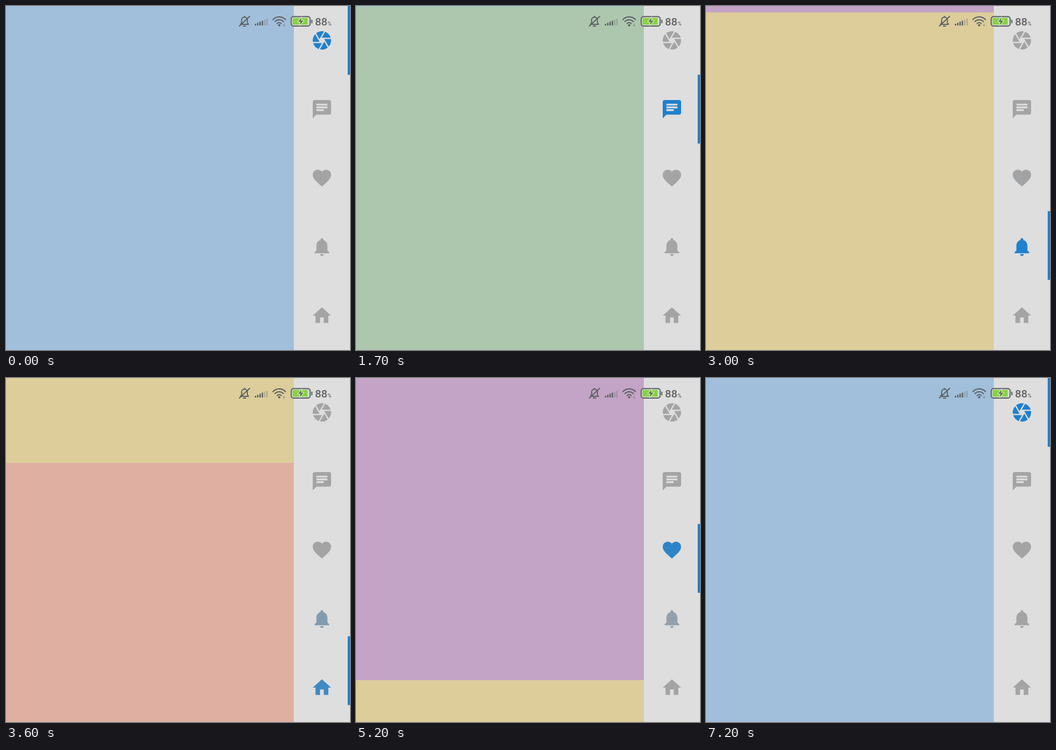
Recreate the animation shown at these times as an HTML page with a canvas. Size 600 px wide and 600 px high, loop 7300 ms.

```html
<!DOCTYPE html>
<html lang="en">
<head>
<meta charset="utf-8">
<title>Vertical tabs</title>
<style>
  html, body { margin: 0; width: 100%; height: 100%; overflow: hidden; background: #dedede; }
  canvas { display: block; width: 600px; height: 600px; }
</style>
</head>
<body>
<canvas id="stage" width="600" height="600"></canvas>
<script>
const ctx = document.getElementById('stage').getContext('2d');
const LOOP = 7300, STEP = 100, SIZE = 600, TAB = 120, PAGE_W = 502;
const PAGES = ['#a1bfda', '#acc7ae', '#c3a3c6', '#dccd9b', '#dfb0a2'];
const GREY = [164, 164, 164], BLUE = [31, 128, 205];
const INK = '#5d6163';

// Each swipe: start, duration, direction
const SWIPES = [
  [800, 1000, 1], [1800, 630, 1], [2450, 700, 1], [3250, 700, 1],
  [4020, 700, -1], [4774, 700, -1], [5686, 700, -1], [6430, 700, -1]
];

// Short drag, then a long settle
const swipe = u => 1 - Math.pow(1 - Math.pow(u, 1.6), 3.5);
const clamp = u => Math.min(1, Math.max(0, u));

const scrollAt = t => SWIPES.reduce(
  (sum, [start, length, dir]) => sum + dir * swipe(clamp((t - start) / length)), 0);

const shutter = new Path2D();
const blade = new Path2D('M21.54 9c-.92-2.92-3.15-5.26-6-6.34L11.88 9h9.66z');
for (let i = 0; i < 6; i++) {
  const turn = new DOMMatrix().translate(12, 12).rotate(i * 60).translate(-12, -12);
  shutter.addPath(blade, turn);
}

const ICONS = [
  shutter,
  new Path2D('M20 2H4c-1.1 0-2 .9-2 2v18l4-4h14c1.1 0 2-.9 2-2V4c0-1.1-.9-2-2-2z' +
    'M6 9h12v2H6zM6 12h8v2H6zM6 6h12v2H6z'),
  new Path2D('M12 21.35l-1.45-1.32C5.4 15.36 2 12.28 2 8.5 2 5.42 4.42 3 7.5 3' +
    'c1.74 0 3.41.81 4.5 2.09C13.09 3.81 14.76 3 16.5 3 19.58 3 22 5.42 22 8.5' +
    'c0 3.78-3.4 6.86-8.55 11.54z'),
  new Path2D('M12 22c1.1 0 2-.9 2-2h-4c0 1.1.9 2 2 2zM18 16v-5c0-3.07-1.64-5.64-4.5-6.32V4' +
    'c0-.83-.67-1.5-1.5-1.5s-1.5.67-1.5 1.5v.68C7.63 5.36 6 7.92 6 11v5l-2 2v1h16v-1z'),
  new Path2D('M10 20v-6h4v6h5v-8h3L12 3 2 12h3v8z')
];

function rect(x, y, w, h, color) {
  ctx.fillStyle = color;
  ctx.fillRect(x, y, w, h);
}

function line(path, width, color) {
  ctx.lineWidth = width;
  ctx.strokeStyle = color;
  ctx.stroke(new Path2D(path));
}

function drawPages(pos) {
  PAGES.forEach((color, i) => {
    const y = Math.round((i - pos) * SIZE);
    if (Math.abs(y) < SIZE) rect(0, y, PAGE_W, SIZE, color);
  });
}

function drawTabs(pos) {
  rect(PAGE_W, 0, SIZE - PAGE_W, SIZE, '#dedede');
  ICONS.forEach((icon, i) => {
    const mix = clamp(1 - Math.abs(i - pos));
    const rgb = GREY.map((g, k) => Math.round(g + (BLUE[k] - g) * mix));
    ctx.save();
    ctx.translate(551, 60 + i * TAB);
    ctx.scale(1.6, 1.6);
    ctx.translate(-12, -12);
    ctx.fillStyle = `rgb(${rgb})`;
    ctx.fill(icon, 'evenodd');
    ctx.restore();
  });
  rect(596, pos * TAB, 4, TAB, `rgb(${BLUE})`);
}

function drawStatus() {
  ctx.lineCap = 'round';
  ctx.lineJoin = 'round';

  // Muted bell
  line('M409 32h14l-2-3v-5c0-6-10-6-10 0v5zM414 35h4M416 18v1', 1.8, INK);
  line('M407 35L425 18', 1.8, INK);

  // Signal
  for (let i = 0; i < 6; i++) {
    const h = 3 + i * 1.8;
    rect(434 + i * 4, 34 - h, 2.4, h, i < 4 ? INK : 'rgba(93,97,99,.3)');
  }

  // Wi-Fi
  ctx.strokeStyle = INK;
  ctx.lineWidth = 2;
  for (const r of [5, 10, 15]) {
    ctx.beginPath();
    ctx.arc(476.5, 34, r, -Math.PI * .76, -Math.PI * .24);
    ctx.stroke();
  }
  ctx.fillStyle = INK;
  ctx.beginPath();
  ctx.arc(476.5, 33.5, 2, 0, Math.PI * 2);
  ctx.fill();
  line('M485 31v4M483.5 33.5l1.5 1.5 1.5-1.5', 1, 'rgba(93,97,99,.6)');

  // Battery
  ctx.beginPath();
  ctx.roundRect(497.5, 18.5, 33, 16.5, 4);
  ctx.fillStyle = '#d3dcd2';
  ctx.fill();
  ctx.lineWidth = 2;
  ctx.strokeStyle = INK;
  ctx.stroke();
  rect(500, 21, 26, 11.5, '#86d33f');
  rect(532.5, 24, 2, 6, INK);
  const bolt = new Path2D('M515.5 20l-6 7.5h4l-1 6 6.5-8h-4.5z');
  ctx.lineWidth = 2.5;
  ctx.strokeStyle = '#dce8d4';
  ctx.stroke(bolt);
  ctx.fillStyle = '#5a7a42';
  ctx.fill(bolt);

  ctx.fillStyle = '#626262';
  ctx.font = '500 19px Roboto, sans-serif';
  ctx.fillText('88', 539, 33.5);
  ctx.font = '500 9px Roboto, sans-serif';
  ctx.fillText('%', 561, 33.5);
}

function draw() {
  const t = performance.now() % LOOP;
  const pos = scrollAt(Math.floor(t / STEP) * STEP);
  drawPages(pos);
  drawTabs(pos);
  drawStatus();
  requestAnimationFrame(draw);
}
draw();
</script>
</body>
</html>
```
